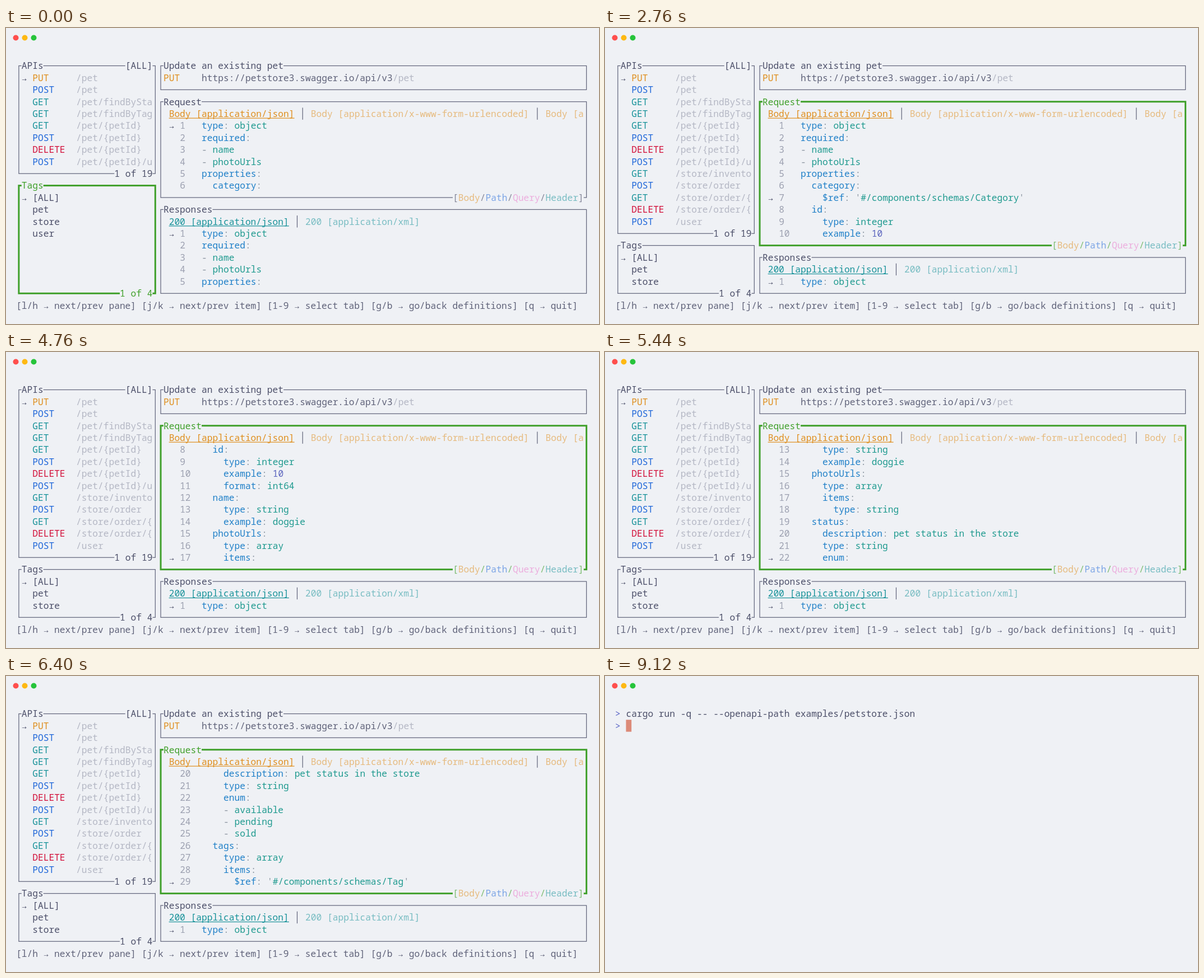
Animation of 1058 by 529 pixels, one loop 9.32 s. Source, as an HTML page:

```html
<!DOCTYPE html>
<html lang="en">
<head>
<meta charset="utf-8">
<title>API browser in a terminal</title>
<style>
html, body { margin: 0; width: 100%; height: 100%; overflow: hidden; background: #eff1f5; }
svg { display: block; width: 1058px; height: 529px; }
text { font: 16.23px "Noto Sans Mono", "DejaVu Sans Mono", monospace; white-space: pre; }
</style>
</head>
<body>
<svg id="stage" viewBox="0 0 1058 529"></svg>
<script>
const LOOP = 9320, KEY_GAP = 120;
const CELL = 9.738, ROW = 21.41, LEFT = 18, TOP = 67.5;
const C = {
  bg: '#eff1f5', text: '#4c4f69', soft: '#5f6279', line: '#5f6279', faint: '#b4b7c4',
  num: '#9ca0b0', green: '#40a02b', yellow: '#df8e1d', blue: '#1e66d9', teal: '#179299',
  red: '#d20f39', pink: '#ea76cb', key: '#2080c8', value: '#1f9a8f', digit: '#5a63bd',
  punct: '#8a95a0', prompt: '#5560c4', cursor: '#dc8a78'
};

const docs = {
  pet: `type: object
required:
- name
- photoUrls
properties:
  category:
    $ref: '#/components/schemas/Category'
  id:
    type: integer
    example: 10
    format: int64
  name:
    type: string
    example: doggie
  photoUrls:
    type: array
    items:
      type: string
  status:
    description: pet status in the store
    type: string
    enum:
    - available
    - pending
    - sold
  tags:
    type: array
    items:
      $ref: '#/components/schemas/Tag'`,
  Category: `type: object
properties:
  id:
    type: integer
    example: 1
    format: int64
  name:
    type: string
    example: Dogs`,
  Tag: `type: object
properties:
  id:
    type: integer
    format: int64
  name:
    type: string`
};
for (const name in docs) docs[name] = docs[name].split('\n');

const apis = `PUT /pet
POST /pet
GET /pet/findByStatus
GET /pet/findByTags
GET /pet/{petId}
POST /pet/{petId}
DELETE /pet/{petId}
POST /pet/{petId}/uploadImage
GET /store/inventory
POST /store/order
GET /store/order/{orderId}
DELETE /store/order/{orderId}
POST /user`.split('\n').map(s => s.split(' '));
const methodColor = { PUT: C.yellow, POST: C.blue, GET: C.teal, DELETE: C.red };

// start, focused pane, document, first cursor line, number of key presses
const runs = [
  [0, 'tags', 'pet', 1, 1], [160, 'url', 'pet', 1, 1],
  [440, 'request', 'pet', 1, 4], [960, 'request', 'pet', 5, 3],
  [1480, 'request', 'Category', 1, 1], [2240, 'request', 'Category', 2, 3],
  [2760, 'request', 'pet', 7, 1], [3560, 'request', 'pet', 8, 2],
  [3840, 'request', 'pet', 10, 3], [4240, 'request', 'pet', 13, 2],
  [4520, 'request', 'pet', 15, 3], [4920, 'request', 'pet', 18, 2],
  [5200, 'request', 'pet', 20, 3], [5600, 'request', 'pet', 23, 3],
  [6000, 'request', 'pet', 26, 1], [6160, 'request', 'pet', 27, 3],
  [7320, 'request', 'Tag', 1, 1], [8120, 'request', 'Tag', 2, 2],
  [8400, 'request', 'pet', 29, 1], [9120, 'shell', 'pet', 1, 1]
];

const stage = document.getElementById('stage');
const colX = c => LEFT + c * CELL;
const rowY = r => TOP + r * ROW;

function add(tag, attrs) {
  const node = document.createElementNS('http://www.w3.org/2000/svg', tag);
  for (const k in attrs) node.setAttribute(k, attrs[k]);
  return stage.appendChild(node);
}
function rect(x, y, width, height, fill) {
  add('rect', { x, y, width, height, fill });
}
function put(col, row, str, fill, extra) {
  add('text', { x: colX(col), y: rowY(row) + 5.8, fill, ...extra }).textContent = str;
  return col + str.length;
}
const BOLD = { 'font-weight': 700 };
const ITALIC = { 'font-style': 'italic' };
const DIM = { opacity: 0.55 };

function box(c0, r0, c1, r1, focused) {
  const x = colX(c0 + 0.5), y = rowY(r0);
  add('rect', {
    x, y, width: colX(c1 + 0.5) - x, height: rowY(r1) - y, fill: 'none',
    stroke: focused ? C.green : C.line, 'stroke-width': focused ? 3 : 1.2
  });
}
// Clears the border behind a label
function gap(col, row, len) {
  rect(colX(col), rowY(row) - 4, len * CELL, 8, C.bg);
}
function label(col, row, str, fill, extra) {
  gap(col, row, str.length);
  put(col, row, str, fill, extra);
}
function pane(c0, r0, c1, r1, title, focused) {
  box(c0, r0, c1, r1, focused);
  label(c0 + 1, r0, title, focused ? C.green : C.text);
}

function tabs(row, names, color) {
  let col = 28;
  names.forEach((name, i) => {
    if (i) {
      rect(colX(col + 1.5) - 0.6, rowY(row) - ROW / 2, 1.2, ROW, C.line);
      col += 3;
    }
    const end = put(col, row, name, color, i ? DIM : BOLD);
    if (!i) rect(colX(col), rowY(row) + 7.4, (end - col) * CELL, 1.2, color);
    col = end;
  });
}

function codeLine(row, src) {
  const [, indent, dash, key, value] = src.match(/^( *)(- )?(?:([$\w]+):)? ?(.*)$/);
  let col = 34 + indent.length;
  if (dash) col = put(col, row, dash, C.punct);
  if (key) {
    col = put(col, row, key, C.key);
    col = put(col, row, ':', C.punct) + 1;
  }
  if (!value) return;
  if (value[0] === "'") {
    col = put(col, row, "'", C.punct);
    col = put(col, row, value.slice(1, -1), C.value);
    put(col, row, "'", C.punct);
  } else {
    put(col, row, value, /^\d+$/.test(value) ? C.digit : C.value);
  }
}
function code(row, count, lines, cursor) {
  const top = Math.max(0, cursor - count);
  lines.slice(top, top + count).forEach((src, i) => {
    const n = top + i + 1;
    if (n === cursor) put(28, row + i, '→', C.text);
    put(30, row + i, String(n), C.num);
    codeLine(row + i, src);
  });
}

function legend(row, names, focused) {
  const colors = [C.yellow, C.blue, C.pink, C.teal];
  const edge = focused ? C.green : C.text;
  const len = names.join('/').length + 2;
  let col = 104 - len;
  gap(col, row, len);
  names.forEach((name, i) => {
    col = put(col, row, i ? '/' : '[', edge, { opacity: 0.65 });
    col = put(col, row, name, colors[i], DIM);
  });
  put(col, row, ']', edge, { opacity: 0.65 });
}

function drawLists(focus) {
  const inTags = focus === 'tags';
  const split = inTags ? 9 : 14;
  pane(0, 0, 25, split, 'APIs', false);
  label(20, 0, '[ALL]', C.text, ITALIC);
  label(18, split, '1 of 19', C.text);
  put(1, 1, '→', C.text);
  apis.slice(0, split - 1).forEach(([method, path], i) => {
    const style = i ? {} : BOLD;
    put(3, i + 1, method, methodColor[method], style);
    put(11, i + 1, path.slice(0, 14), C.faint, style);
  });

  pane(0, split + 1, 25, 19, 'Tags', inTags);
  label(19, 19, '1 of 4', inTags ? C.green : C.text);
  put(1, split + 2, '→', C.text);
  ['[ALL]', 'pet', 'store', 'user'].slice(0, 17 - split).forEach((name, i) =>
    put(3, split + 2 + i, name, C.text, i ? {} : BOLD));
}

function drawDetails(focus, doc, cursor) {
  const inRequest = focus === 'request';
  const end = inRequest ? 15 : 11;
  pane(26, 0, 104, 2, 'Update an existing pet', focus === 'url');
  put(27, 1, 'PUT', C.yellow);
  put(put(34, 1, 'https://petstore3.swagger.io/api/v3', C.soft), 1, '/pet', C.faint);

  pane(26, 3, 104, end, 'Request', inRequest);
  tabs(4, ['Body [application/json]', 'Body [application/x-www-form-urlencoded]', 'Body [a'], C.yellow);
  code(5, end - 5, docs[doc], cursor);
  const nested = doc !== 'pet';
  if (nested) label(27, end, `[ ${doc} ]`, '#cdd0da', ITALIC);
  const parts = ['Body', 'Path', 'Query', 'Header'];
  legend(end, nested ? parts.map(s => s[0]) : parts, inRequest);

  pane(26, end + 1, 104, 19, 'Responses', false);
  tabs(end + 2, ['200 [application/json]', '200 [application/xml]'], C.teal);
  code(end + 3, 16 - end, docs.pet.slice(0, 16 - end), 1);
}

function drawShell() {
  put(0, 0, '>', C.prompt, BOLD);
  put(2, 0, 'cargo run -q -- --openapi-path examples/petstore.json', C.text);
  put(0, 1, '>', C.prompt, BOLD);
  rect(colX(2), rowY(1) - ROW / 2, CELL, ROW, C.cursor);
}

function draw(focus, doc, cursor) {
  stage.replaceChildren();
  rect(0, 0, 1058, 529, C.bg);
  ['#ff4f4d', '#feb913', '#26c43a'].forEach((fill, i) =>
    add('circle', { cx: 17.5 + 16 * i, cy: 17.5, r: 5, fill }));
  if (focus === 'shell') return drawShell();
  drawLists(focus);
  drawDetails(focus, doc, cursor);
  put(0, 20, '[l/h → next/prev pane] [j/k → next/prev item] [1-9 → select tab] ' +
    '[g/b → go/back definitions] [q → quit]', C.soft);
}

const begin = performance.now();
let shown = '';
function tick() {
  const t = (performance.now() - begin) % LOOP;
  const [start, focus, doc, first, count] = runs.filter(run => run[0] <= t).pop();
  const cursor = first + Math.min(count - 1, Math.floor((t - start) / KEY_GAP));
  const state = [focus, doc, cursor].join();
  if (state !== shown) {
    shown = state;
    draw(focus, doc, cursor);
  }
  requestAnimationFrame(tick);
}
tick();
</script>
</body>
</html>
```
